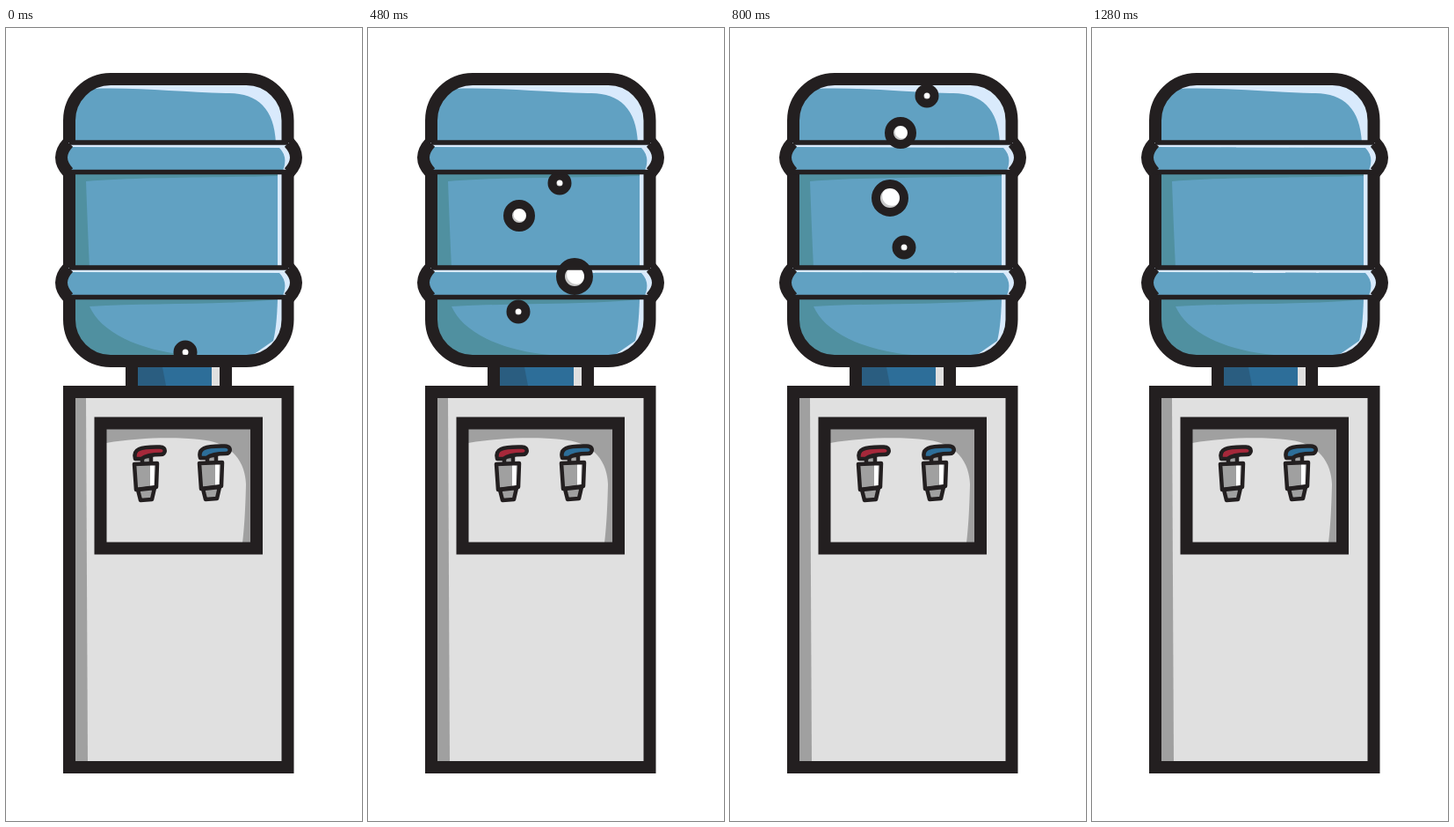
Recreate the animation shown at these times as an HTML page. Size 405 by 900 pixels, loop 3960 ms.

```html
<!DOCTYPE html>
<html lang="en">
<head>
<meta charset="utf-8">
<title>Water cooler</title>
<style>
  html, body { margin: 0; width: 100%; height: 100%; overflow: hidden; background: #fff; }
  svg { display: block; width: 100vw; height: 100vh; }
  .line { fill: none; stroke: #231f20; stroke-width: 14; }
  .thin { stroke-width: 5.5; }
  .ink { fill: #231f20; }
  .water { fill: #61a1c2; }
  .shine { fill: #d9eafc; }
  .deep { fill: #5090a0; }
  .metal { fill: #e0e0e0; }
  .shade { fill: #a0a0a0; }
  .tap { stroke: #231f20; stroke-width: 4.5; stroke-linejoin: round; }
</style>
</head>
<body>
<svg viewBox="0 0 405 900">
  <defs>
    <g id="band">
      <path class="shine" d="M71 0Q55 17 71 34H322Q338 17 322 0Z"/>
      <path class="water" d="M71 5Q55 17 71 34H314Q322 17 311 6Z"/>
    </g>
    <g id="bandLines">
      <path class="line" d="M71 0Q55 17 71 34M322 0Q338 17 322 34"/>
      <path class="line thin" d="M72 0H321M72 33.5H321"/>
    </g>
    <g id="tap">
      <path class="shade tap" d="M155 486H165V495H155Z"/>
      <path class="tap" d="M147 489C144 478 152 475 175 475.5C183 476 182 484 176 484C166 484 158 486 154 489Z"/>
      <path class="metal" d="M146 495L172 494L171 521L148 524Z"/>
      <path class="shade" d="M146 495H164V522L148 524Z"/>
      <path fill="#fff" d="M164 495H168V522H164Z"/>
      <path fill="none" class="tap" d="M146 495L172 494L171 521L148 524Z"/>
      <path class="shade tap" d="M150 524L169 522L166 535L153 536Z"/>
    </g>
  </defs>

  <rect class="shine" x="72" y="58" width="248.5" height="320" rx="47"/>
  <path class="water" d="M79 130V75L97 69C150 67 200 73 250 74C285 73 305 90 307 130Z"/>
  <path class="water" d="M79 163H309V308Q308 340 304 355L275 375H107Q79 371 79 338Z"/>
  <path class="deep" d="M79 163H309V168C240 170 150 169 91 174Q93 230 95 272H79Z"/>
  <path class="deep" d="M79 305H309V308C240 315 160 312 95 316C108 345 150 366 207 371H107Q79 371 79 338Z"/>
  <use href="#band" y="130"/>
  <use href="#band" y="272"/>

  <g id="bubbles"></g>

  <path class="line" d="M72 130V105A47 47 0 0 1 119 58H273.5A47 47 0 0 1 320.5 105V130M72 163V272M320.5 163V272M72 305V331A47 47 0 0 0 119 378H273.5A47 47 0 0 0 320.5 331V305"/>
  <use href="#bandLines" y="130"/>
  <use href="#bandLines" y="272"/>

  <path class="ink" d="M136 380H257V410H136Z"/>
  <path fill="#2d6e99" d="M150 385H234V406H150Z"/>
  <path fill="#2a5d80" d="M150 385H178L182 406H150Z"/>
  <path class="metal" d="M234 385H243V406H234Z"/>

  <path class="metal" d="M72 413H320.5V839H72Z"/>
  <path class="shade" d="M79 420H91L93 832H79Z"/>
  <path class="line" d="M72 413H320.5V839H72Z"/>

  <path class="shade" d="M107.5 448.5H285V590.5H107.5Z"/>
  <path class="metal" d="M114 471C150 465 190 464 220 467C255 470 272 490 273 518Q272 560 269 584H114Z"/>
  <path class="line" d="M107.5 448.5H285V590.5H107.5Z"/>
  <use href="#tap" fill="#a6283a"/>
  <use href="#tap" x="74" y="-1" fill="#2d6e99"/>
</svg>
<script>
const LOOP = 3960, STEP = 40, BEAT = 160, RING = 10, LID = 63;

// r: inner radius; from: first beat; way: the bubble's centre on each beat
const bubbles = [
  { r: 3.5, from: 0, way: [[204,368], [225,316], [230,250], [218,176], [226,128], [224,77], [222,35]] },
  { r: 8, from: 0, way: [[175,415], [160,350], [169,280], [172,213], [167,177], [194,119], [198,70]] },
  { r: 11, from: 0, way: [[200,408], [222,366], [236,324], [235,282], [210,238], [182,193], [202,107], [206,45]] },
  { r: 3.5, from: 1, way: [[190,410], [178,354], [171,322], [203,285], [198,249], [179,181], [205,106], [190,68]] }
];

const layer = document.getElementById('bubbles');
for (const b of bubbles) {
  const shift = b.r / 5;
  b.node = document.createElementNS('http://www.w3.org/2000/svg', 'g');
  b.node.innerHTML = `<circle r="${b.r + 1}" fill="#c8c8c8"/>
    <circle cx="${shift}" cy="${-shift}" r="${b.r}" fill="#fff"/>
    <circle r="${b.r + RING / 2}" fill="none" stroke="#231f20" stroke-width="${RING}"/>`;
  layer.append(b.node);
}

// Smooth (Catmull-Rom) curve through the points
function place(way, beat) {
  const last = way.length - 1, i = Math.min(Math.floor(beat), last - 1), u = beat - i;
  const [p, a, b, n] = [-1, 0, 1, 2].map(k => way[Math.max(0, Math.min(last, i + k))]);
  return [0, 1].map(k => a[k] + u / 2 * (b[k] - p[k]
    + u * (2 * p[k] - 5 * a[k] + 4 * b[k] - n[k]
    + u * (3 * (a[k] - b[k]) + n[k] - p[k]))));
}

const start = performance.now();
function draw(now) {
  const t = Math.floor(Math.max(0, now - start) % LOOP / STEP) * STEP;
  for (const { r, from, way, node } of bubbles) {
    const beat = t / BEAT - from;
    const [x, y] = place(way, Math.max(0, Math.min(way.length - 1, beat)));
    // A bubble pops when it touches the lid
    const shown = beat >= 0 && y - r - RING >= LID;
    node.style.display = shown ? '' : 'none';
    node.setAttribute('transform', `translate(${x} ${y})`);
  }
  requestAnimationFrame(draw);
}
draw(start);
</script>
</body>
</html>
```
